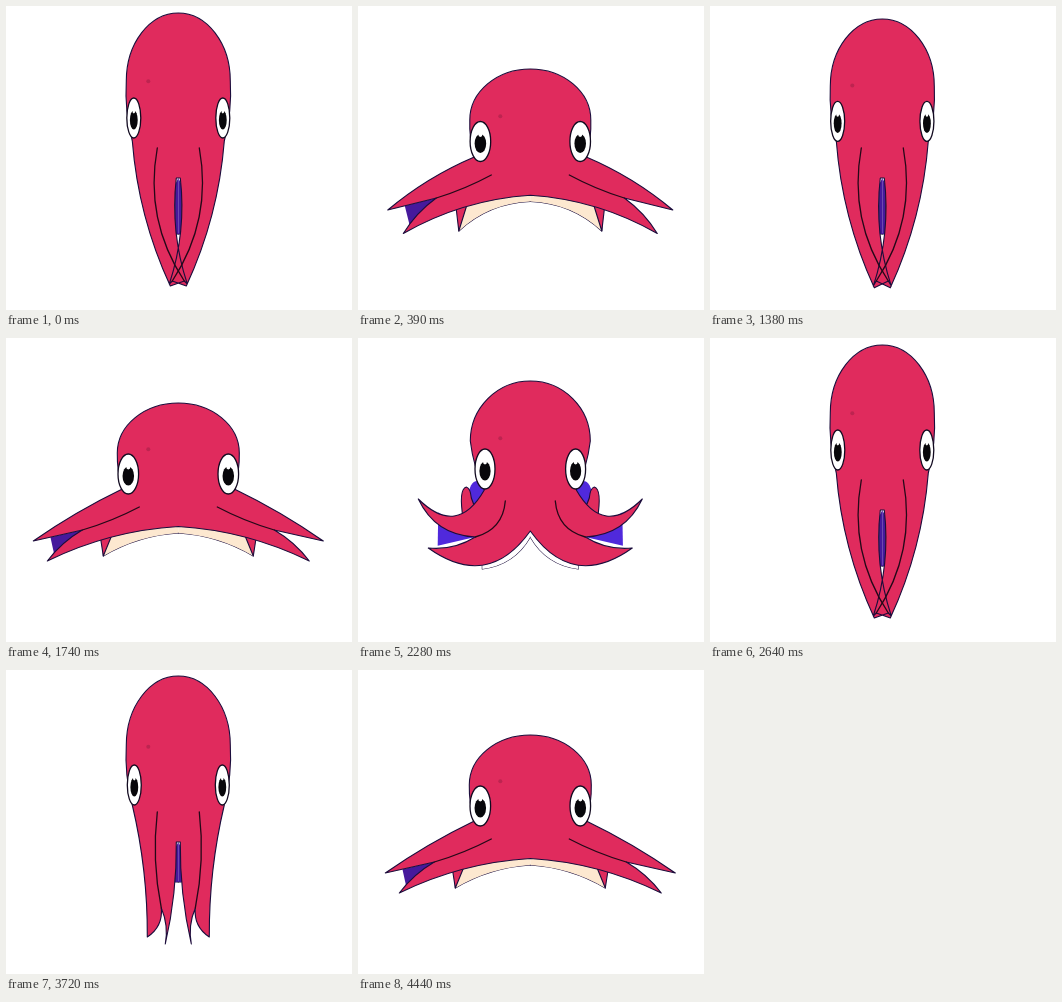
An HTML page with a canvas that plays this animation: 346 px wide and 304 px high, repeating every 4500 ms.

```html
<!DOCTYPE html>
<html lang="en">
<head>
<meta charset="utf-8">
<title>Swimming octopus</title>
<style>
html, body { margin: 0; width: 100%; height: 100%; overflow: hidden; background: #fff; }
canvas { display: block; width: 346px; height: 304px; }
</style>
</head>
<body>
<canvas id="stage" width="346" height="304"></canvas>
<script>
const ctx = document.getElementById('stage').getContext('2d');
const AXIS = 172.3, LOOP = 4500, STEP = 90, PERIOD = 44 / 3;
const RED = '#e02b5d', INK = '#1b0d3c', PURPLE = '#5029dc', INDIGO = '#46199c', CREAM = '#fde8d0';

// Interpolates numbers, points and whole poses alike
function mix(a, b, t) {
  if (typeof a === 'number') return a + (b - a) * t;
  if (Array.isArray(a)) return a.map((v, i) => mix(v, b[i], t));
  return Object.fromEntries(Object.keys(a).map(k => [k, mix(a[k], b[k], t)]));
}

// Points are [distance from the axis, y]; bend is how far an edge bows, relative to its length
const long = {
  top: 6, cheek: [52, 75], neck: [46, 135], eye: [44, 115], eyeWidth: 7,
  tip1: [31, 267], fork: [17, 238], tip2: [13, 274], base: [2, 172],
  inner: [3, 212], depth: 212, crease: [21, 142],
  bend: { outer: 0.06, under: -0.3, over: 0.15, bottom: -0.06, lining: 0, crease: -0.08 }
};
const closed = {
  ...long, top: 7, eye: [44.5, 112],
  tip1: [8, 280], fork: [-6, 275], tip2: [-9, 278], inner: [3, 228], depth: 228,
  bend: { outer: -0.09, under: 0, over: 0, bottom: 0.11, lining: 0, crease: -0.2 }
};
const sunk = { ...closed, top: 30, cheek: [52, 95], eye: [45, 125], tip1: [8, 287], tip2: [-9, 286] };
const curl = {
  top: 43, cheek: [60, 103], neck: [46, 152], eye: [45.3, 131], eyeWidth: 10,
  tip1: [112, 161], fork: [55, 199], tip2: [102, 210], base: [0, 193],
  inner: [48, 231], depth: 199, crease: [25, 163],
  bend: { outer: 0.65, under: -0.3, over: 0.17, bottom: -0.5, lining: -0.25, crease: 0.35 }
};
const spread = {
  top: 61, cheek: [60, 113], neck: [56, 151], eye: [49.8, 135], eyeWidth: 10.3,
  tip1: [140, 205], fork: [92, 192], tip2: [123, 232], base: [0, 190],
  inner: [68, 232], depth: 196, crease: [39, 169],
  bend: { outer: -0.11, under: 0, over: -0.1, bottom: 0.13, lining: 0.25, crease: 0.05 }
};
const wide = {
  ...spread, top: 65, cheek: [61, 115], eye: [50, 136],
  tip1: [145, 203], fork: [96, 192], tip2: [131, 223], base: [0, 188.5], inner: [75, 218], depth: 195,
  bend: { ...spread.bend, outer: -0.04, bottom: 0.1, lining: 0.12 }
};
const glide = { ...mix(wide, curl, 0.3), tip1: [150, 188] };

const keys = [
  [0, closed], [0.7, closed], [2.6, sunk], [3.98, spread], [4.67, spread], [5.33, wide], [6, wide],
  [9.8, glide], [11, curl], [11.34, curl], [12.4, long], [12.67, long], [PERIOD, closed]
];

function poseAt(phase) {
  const next = Math.max(1, keys.findIndex(key => key[0] >= phase));
  const [t0, from] = keys[next - 1], [t1, to] = keys[next];
  const t = (phase - t0) / (t1 - t0);
  return mix(from, to, t * t * (3 - 2 * t));
}

function edge([x0, y0], [x1, y1], bend) {
  const control = [(x0 + x1) / 2 - bend * (y1 - y0), (y0 + y1) / 2 + bend * (x1 - x0)];
  return { from: [x0, y0], control, to: [x1, y1] };
}

function paint(path, fill, stroke, width = 1.1) {
  if (fill) { ctx.fillStyle = fill; ctx.fill(path); }
  if (stroke) { ctx.strokeStyle = stroke; ctx.lineWidth = width; ctx.stroke(path); }
}

function polygon(...points) {
  const path = new Path2D();
  points.forEach(p => path.lineTo(...p));
  path.closePath();
  return path;
}

function ellipse(x, y, rx, ry) {
  const path = new Path2D();
  path.ellipse(x, y, rx, ry, 0, 0, 2 * Math.PI);
  return path;
}

function curve({ from, control, to }) {
  const path = new Path2D();
  path.moveTo(...from);
  path.quadraticCurveTo(...control, ...to);
  return path;
}

function bothSides(draw) {
  for (const side of [-1, 1]) {
    ctx.save();
    ctx.scale(side, 1);
    draw(side);
    ctx.restore();
  }
}

// Dome, down the right side, then back up the mirrored left side
function outline(p) {
  const path = new Path2D(), [cx, cy] = p.cheek;
  const edges = [
    edge(p.cheek, p.neck, -0.08),
    edge(p.neck, p.tip1, p.bend.outer),
    edge(p.tip1, p.fork, p.bend.under),
    edge(p.fork, p.tip2, p.bend.over),
    edge(p.tip2, p.base, p.bend.bottom)
  ];
  const flip = ([x, y]) => [-x, y];
  path.ellipse(0, cy, cx, cy - p.top, 0, Math.PI, 2 * Math.PI);
  edges.forEach(e => path.quadraticCurveTo(...e.control, ...e.to));
  path.lineTo(...flip(p.base));
  edges.reverse().forEach(e => path.quadraticCurveTo(...flip(e.control), ...flip(e.from)));
  path.closePath();
  return path;
}

function drawUnderside(p, fill, hasInnerArm) {
  const { control, to } = edge(p.inner, [0, p.depth], p.bend.lining);
  const [x] = p.inner, y = p.base[1];
  const path = new Path2D();
  path.moveTo(x, y + 6);
  path.lineTo(...p.inner);
  path.quadraticCurveTo(...control, ...to);
  paint(path, null, INK);
  path.lineTo(0, y);
  paint(path, fill);
  if (hasInnerArm) paint(polygon([x + 3, y + 10], p.inner, [x - 8, y + 10]), RED, INK);
}

function drawBackArm() {
  paint(ellipse(53, 158, 9, 15), PURPLE);
  paint(new Path2D('M67 182Q72 151 64 149Q60 150 59 160Q56 172 44 174V184Z'), RED, INK);
}

function drawEye(p) {
  const [x, y] = p.eye, rx = p.eyeWidth, ry = 20;
  paint(ellipse(x, y, rx, ry), '#fff', '#120a20', 1.3);
  paint(ellipse(x, y + 2, rx * 0.56, ry * 0.48), '#08070b');
  paint(ellipse(x, y - ry * 0.36, rx * 0.2, ry * 0.13), '#fff');
}

function drawOctopus(phase) {
  const p = poseAt(phase);
  const isLong = phase < 3 || phase > 11.8;
  const isCurled = phase > 10.4 && phase < 11.8;
  const lining = isLong ? INDIGO : isCurled ? '#fff' : CREAM;

  bothSides(side => {
    if (isCurled) drawBackArm();
    if (!isLong && (side < 0 || phase > 7)) {
      const web = polygon(mix(p.tip1, p.fork, 0.35), mix(p.tip2, p.fork, 0.2), p.fork);
      paint(web, isCurled ? PURPLE : INDIGO);
    }
    drawUnderside(p, lining, !isLong && !isCurled);
  });
  paint(outline(p), RED, INK);
  bothSides(() => {
    paint(curve(edge(p.crease, p.fork, p.bend.crease)), null, '#240818', 1.3);
    drawEye(p);
  });
  paint(ellipse(-30, mix(p.top, p.eye[1], 0.65), 2, 2), '#bd2450');
}

function render(time) {
  const step = time < 30 ? 0 : 1 + Math.floor((time - 30) / STEP);
  ctx.setTransform(1, 0, 0, 1, 0, 0);
  ctx.fillStyle = '#fff';
  ctx.fillRect(0, 0, 346, 304);
  ctx.translate(AXIS, 0);
  ctx.lineJoin = ctx.lineCap = 'round';
  drawOctopus(step % PERIOD);
}

const start = performance.now();
function tick(now) {
  render(Math.max(0, now - start) % LOOP);
  requestAnimationFrame(tick);
}
tick(start);
</script>
</body>
</html>
```
